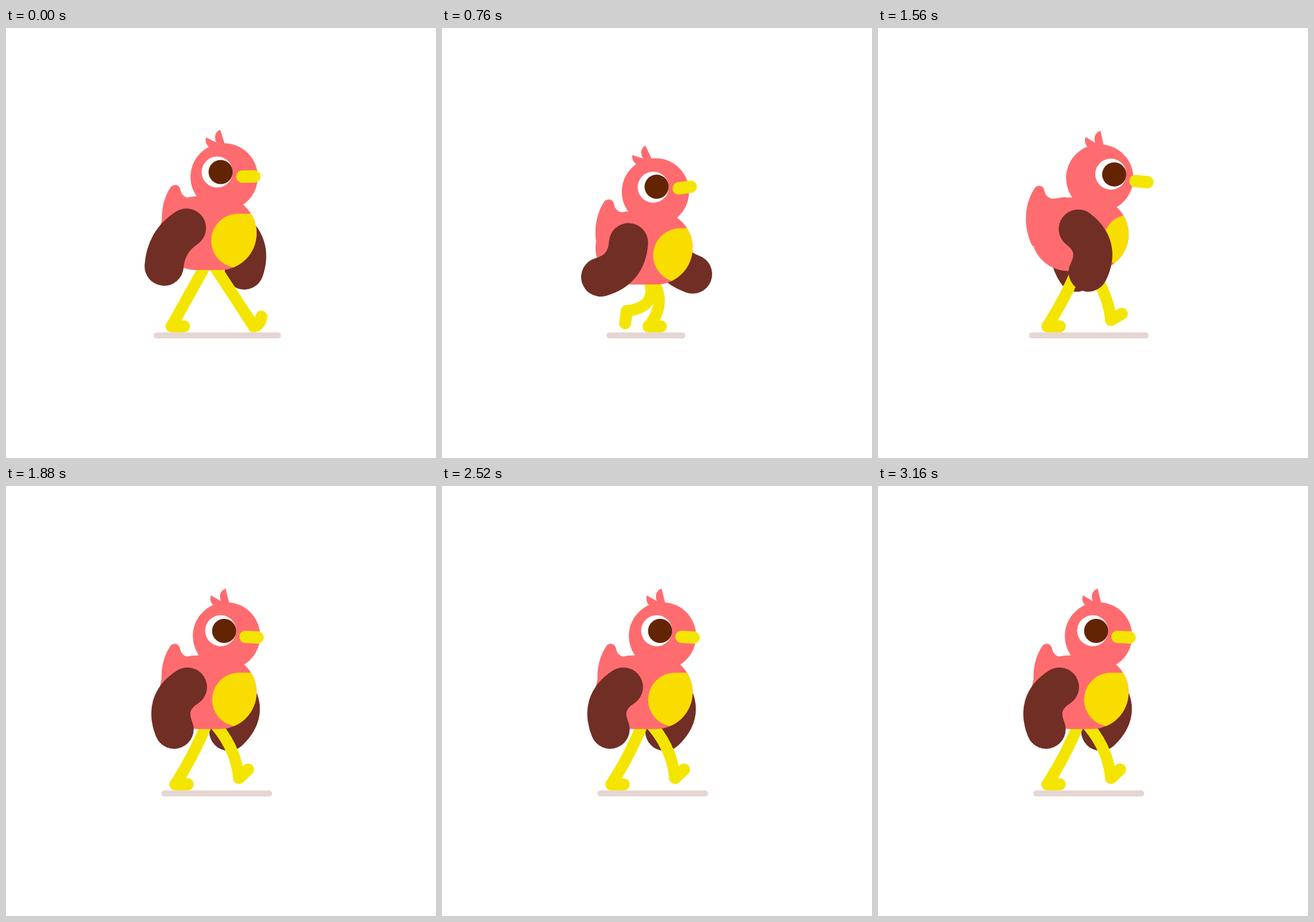
An HTML page that plays this animation: 748x748 px, repeating every 3.2 s.

```html
<!DOCTYPE html>
<html lang="en">
<head>
<meta charset="utf-8">
<title>Walking bird</title>
<style>
  html, body { margin: 0; width: 100%; height: 100%; overflow: hidden; background: #fff; }
  svg { display: block; width: 100%; height: 100%; }
  .pink { fill: #ff6c6f; }
  .wing { fill: none; stroke: #712e24; stroke-width: 68; stroke-linecap: round; }
  .leg, .foot { fill: none; stroke: #f4e500; stroke-linecap: round; stroke-linejoin: round; }
  .leg { stroke-width: 20; }
  .foot { stroke-width: 21; }
</style>
</head>
<body>
<svg viewBox="0 0 748 748">
  <defs>
    <clipPath id="torso"><rect x="267" y="293" width="169" height="128" rx="64"/></clipPath>
  </defs>
  <rect id="ground" y="529.5" height="10.5" rx="5.2" fill="#e5d6d4"/>
  <path id="farWing" class="wing"/>
  <path id="legA" class="leg"/><path id="footA" class="foot"/>
  <path id="legB" class="leg"/><path id="footB" class="foot"/>
  <g id="body">
    <path id="tail" class="pink" d="M282 377C266 345 268 305 286 277.5C290 271 301 271 303 280C305 291 312 296 321 295L340 292V377Z"/>
    <rect class="pink" x="267" y="293" width="169" height="128" rx="64"/>
    <g clip-path="url(#torso)">
      <rect id="chest" x="357" y="323" width="150" height="94" rx="47" fill="#f9dd00"/>
    </g>
    <g id="head">
      <circle class="pink" cx="380" cy="259" r="58.5"/>
      <path class="pink" d="M374 177L382 203L374 212L358 210C350 205 347 198 349 190L367 199C363 191 364 181 374 177Z"/>
      <g id="face">
        <circle cx="368" cy="250.5" r="27" fill="#fff"/>
        <circle cx="374" cy="250.5" r="21" fill="#632404"/>
        <rect x="401" y="248" width="42.5" height="21.5" rx="10.75" fill="#f4e500"/>
      </g>
    </g>
  </g>
  <path id="nearWing" class="wing"/>
</svg>
<script>
const STEP = 40, CYCLE = 16, HALF = CYCLE / 2;
const $ = id => document.getElementById(id);
const set = (id, attrs) => {
  for (const name in attrs) $(id).setAttribute(name, attrs[name]);
};
const move = (id, x, y) => set(id, { transform: `translate(${x} ${y})` });
const rad = deg => deg * Math.PI / 180;
const wave = (k, peak, period = CYCLE) => Math.cos((k - peak) / period * 2 * Math.PI);
const easeInOut = t => t < 0.5 ? 4 * t ** 3 : 1 - 4 * (1 - t) ** 3;

// Quadratic limb whose middle is pushed sideways
function limb(x0, y0, x1, y1, bend) {
  const dx = x1 - x0, dy = y1 - y0, len = Math.hypot(dx, dy);
  const cx = (x0 + x1) / 2 + bend * dy / len;
  const cy = (y0 + y1) / 2 - bend * dx / len;
  return `M${x0} ${y0}Q${cx} ${cy} ${x1} ${y1}`;
}

// First half of the cycle: foot slides back on the ground; second half: it swings forward
function stride(k, toeLift) {
  const x = 288 + 143 * Math.abs(1 - k / HALF) ** 1.48;
  const arc = Math.sin(k % HALF / HALF * Math.PI);
  if (k < HALF) {
    const angle = -toeLift * Math.max(0, 1 - k / 1.5);
    return { x, y: 519, angle, sole: angle * 0.2, bow: 42 * arc ** 2 };
  }
  const roll = Math.sin((k / HALF - 1) * 1.5 * Math.PI);
  const angle = roll * (roll > 0 ? 100 : toeLift);
  return { x, y: 519 - 29 * arc, angle, sole: angle, bow: 50 * arc };
}

function drawLeg(name, k, hipX, hipY, toeLift) {
  const { x, y, angle, sole, bow } = stride(k, toeLift);
  const reach = 21.5;
  const along = (deg, r) => `${x + r * Math.cos(rad(deg))} ${y + r * Math.sin(rad(deg))}`;
  set('leg' + name, { d: limb(hipX + 3 * wave(k, 0), hipY, x, y, bow) });
  set('foot' + name, { d: `M${x} ${y}Q${along(sole, reach / 2)} ${along(angle, reach)}` });
}

function drawWing(id, x, y, deg, bend) {
  const a = rad(deg), len = 77;
  set(id, { d: limb(x, y, x + len * Math.sin(a), y + len * Math.cos(a), bend) });
}

function draw(k) {
  const bob = 27 * easeInOut(1 - Math.abs(k % HALF / 4 - 1));
  const turn = (1 + wave(k, 8.1)) / 2;
  const nod = -1.9 + 6.7 * wave(k, 6.45, HALF) - wave(k, 15);

  const shadow = 84 + 31 * wave(k, 0.3, HALF) - 4 * wave(k, 14.5);
  set('ground', { x: 367.5 - bob / 2 - shadow, width: 2 * shadow });

  move('body', 0, bob);
  move('tail', -14.5 * turn, 0);
  move('chest', 36 * turn, 0);
  set('head', { transform: `rotate(${nod} 380 322)` });
  move('face', 32 * turn, 0);

  const hipX = 354 + bob * 0.2, hipY = 406 + bob;
  drawLeg('A', k, hipX, hipY, 52);
  drawLeg('B', (k + HALF) % CYCLE, hipX, hipY, 36);

  // Each wing bends against the direction it swings in
  const shoulderY = 348 + bob;
  drawWing('nearWing', 314 + 36 * turn, shoulderY, -2.3 - 39.7 * wave(k, 2), 42 * wave(k, 5.2));
  drawWing('farWing', 390 - 28 * turn, shoulderY, -7 + 52 * wave(k, 2.7), -43 * wave(k, 5.9));
}

const start = performance.now();
function tick() {
  draw(Math.floor((performance.now() - start) / STEP) % CYCLE);
  requestAnimationFrame(tick);
}
tick();
</script>
</body>
</html>
```
